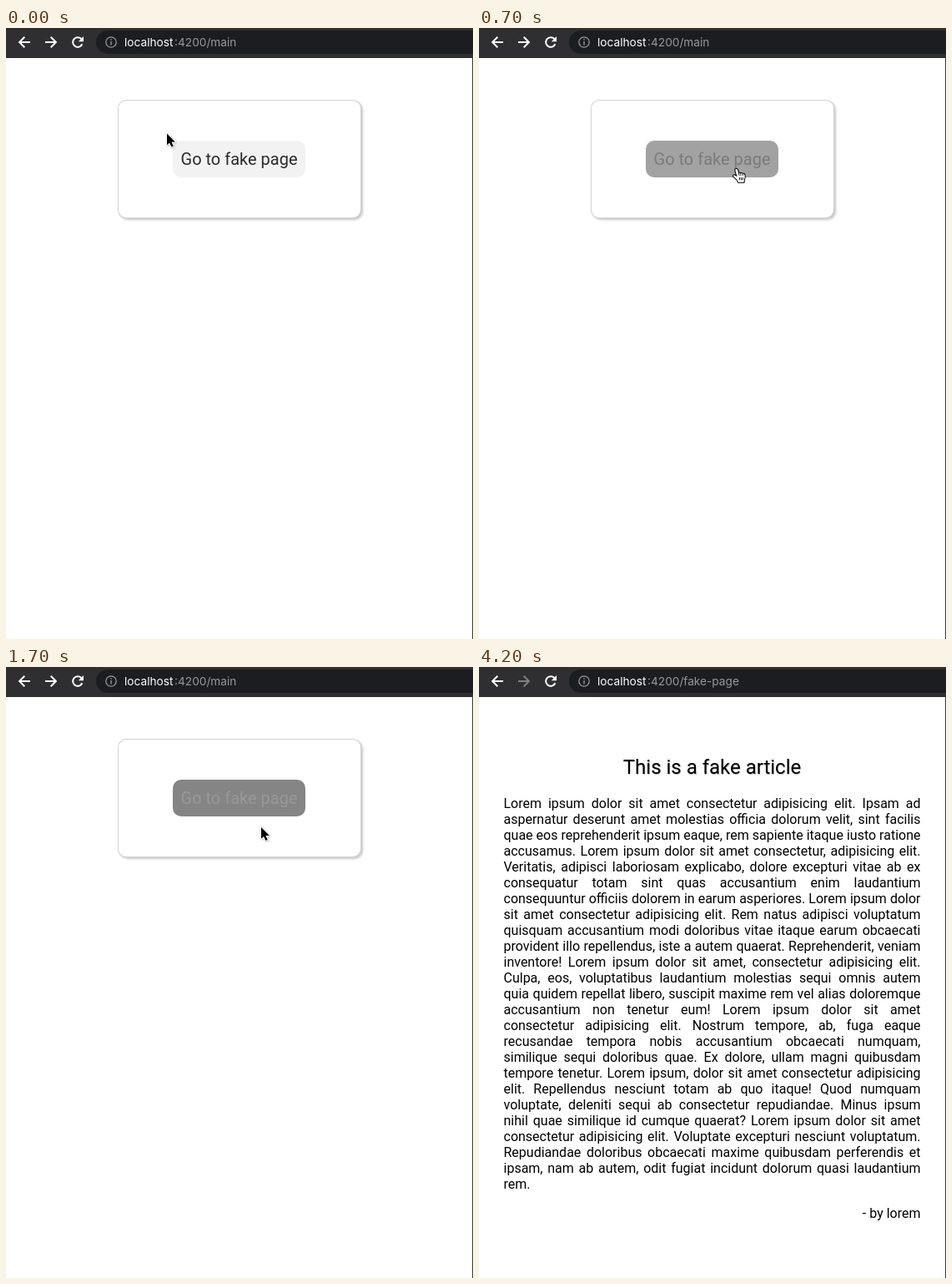
Write an HTML page with a canvas that moves like this. It is 560x732 px and loops after 4.6 s.

```html
<!DOCTYPE html>
<html lang="en">
<head>
<meta charset="utf-8">
<title>Page navigation</title>
<style>
  html, body { margin: 0; width: 100%; height: 100%; overflow: hidden; background: #fff; }
  canvas { display: block; width: 560px; height: 732px; }
</style>
</head>
<body>
<canvas id="stage" width="560" height="732"></canvas>
<script>
const ctx = document.getElementById('stage').getContext('2d');
const LOOP = 4600;
const ARTICLE_AT = 3300;
const INK = 43, PAPER = 242;

// Each pose holds until the next: start ms, cursor, x, y, button darkness.
const poses = [
  [0, 'arrow', 193, 126.5, 0],
  [100, 'hand', 245, 146, 0.1],
  [200, 'hand', 294, 166, 0.2],
  [300, 'arrow', 311, 179, 0],
  [600, 'hand', 308, 176, 0],
  [700, 'hand', 304, 168, 0.4],
  [800, 'hand', 301.5, 163, 0.85],
  [900, 'hand', 300.8, 161.5, 1],
  [1500, 'hand', 301.5, 170, 1],
  [1600, 'arrow', 306, 184, 0.95],
  [1700, 'arrow', 306, 192, 0.55],
  [1800, 'arrow', 306, 197, 0.12],
  [1900, 'arrow', 306, 198, 0],
  [ARTICLE_AT, 'beam', 195, 214.5, 0],
  [4000, 'beam', 190, 214.5, 0],
  [4100, 'none', 0, 0, 0]
];

const lines = `Lorem ipsum dolor sit amet consectetur adipisicing elit. Ipsam ad
aspernatur deserunt amet molestias officia dolorum velit, sint facilis
quae eos reprehenderit ipsum eaque, rem sapiente itaque iusto ratione
accusamus. Lorem ipsum dolor sit amet consectetur, adipisicing elit.
Veritatis, adipisci laboriosam explicabo, dolore excepturi vitae ab ex
consequatur totam sint quas accusantium enim laudantium
consequuntur officiis dolorem in earum asperiores. Lorem ipsum dolor
sit amet consectetur adipisicing elit. Rem natus adipisci voluptatum
quisquam accusantium modi doloribus vitae itaque earum obcaecati
provident illo repellendus, iste a autem quaerat. Reprehenderit, veniam
inventore! Lorem ipsum dolor sit amet, consectetur adipisicing elit.
Culpa, eos, voluptatibus laudantium molestias sequi omnis autem
quia quidem repellat libero, suscipit maxime rem vel alias doloremque
accusantium non tenetur eum! Lorem ipsum dolor sit amet
consectetur adipisicing elit. Nostrum tempore, ab, fuga eaque
recusandae tempora nobis accusantium obcaecati numquam,
similique sequi doloribus quae. Ex dolore, ullam magni quibusdam
tempore tenetur. Lorem ipsum, dolor sit amet consectetur adipisicing
elit. Repellendus nesciunt totam ab quo itaque! Quod numquam
voluptate, deleniti sequi ab consectetur repudiandae. Minus ipsum
nihil quae similique id cumque quaerat? Lorem ipsum dolor sit amet
consectetur adipisicing elit. Voluptate excepturi nesciunt voluptatum.
Repudiandae doloribus obcaecati maxime quibusdam perferendis et
ipsam, nam ab autem, odit fugiat incidunt dolorum quasi laudantium
rem.`.split('\n');

const arrowShape = new Path2D('M0 0V13.8L3.1 10.9 5.4 16 7.7 15 5.5 9.9H9.9Z');
const handShape = new Path2D('M5.6 10.2L3.4 3Q3 1 4.5.8 5.8.8 6.2 2.4L7.4 6.2Q8.6 5.2 9.6 6.4 ' +
  '11 5.4 12 6.8 14.2 6.2 14.6 8.4 15.2 11 14 13.5L13.6 16.8H7Q6 14 3.8 12.2L.9 9.6Q.8 8 2.4 8.2Z');
const handLines = new Path2D('M7.4 6.2L8.2 8.8M9.6 6.4L10.1 8.8M12 6.8L12.4 8.8M8.4 11V14.2M10.4 11V14.2M12.3 11V14.2');
const beamShape = new Path2D('M-2.5-7.5Q0-7.5 0-5.5 0-7.5 2.5-7.5M0-5.5V5.5M-2.5 7.5Q0 7.5 0 5.5 0 7.5 2.5 7.5M-1.5 3H1.5');

function text(str, x, y, font, color, align = 'left') {
  ctx.font = font;
  ctx.fillStyle = color;
  ctx.textAlign = align;
  ctx.fillText(str, x, y);
}

function box(x, y, w, h, r, color) {
  ctx.beginPath();
  ctx.roundRect(x, y, w, h, r);
  ctx.fillStyle = color;
  ctx.fill();
}

function stroke(path, color, width) {
  ctx.strokeStyle = color;
  ctx.lineWidth = width;
  ctx.stroke(path);
}

function shadow(color, offset, blur) {
  ctx.shadowColor = color;
  ctx.shadowOffsetX = ctx.shadowOffsetY = offset;
  ctx.shadowBlur = blur;
}

function navArrow(x, dir, color) {
  ctx.save();
  ctx.translate(x, 17);
  ctx.scale(dir, 1);
  stroke(new Path2D('M7 0H-5.5M.3-6.2L-5.9 0 .3 6.2'), color, 2);
  ctx.restore();
}

function drawToolbar(onArticle) {
  box(0, 0, 560, 36, 0, '#2f2f31');
  box(108, 3, 480, 28, 14, '#1c1d20');
  navArrow(22, 1, '#fff');
  navArrow(54, -1, onArticle ? '#7e7f82' : '#fff');

  const ring = new Path2D();
  ring.arc(86, 17, 5.8, 0.4, Math.PI * 2 - 0.7);
  stroke(ring, '#fff', 2);
  ctx.fillStyle = '#fff';
  ctx.fill(new Path2D('M93 10V16.2H86.8Z'));

  const info = new Path2D();
  info.arc(126, 17, 6.2, 0, Math.PI * 2);
  stroke(info, '#96999d', 1.3);
  box(125.3, 16, 1.4, 4.5, 0, '#96999d');
  box(125.3, 13.2, 1.4, 1.5, 0, '#96999d');

  const font = '13.7px Inter, sans-serif';
  text('localhost', 142, 22, font, '#fff');
  text(onArticle ? ':4200/fake-page' : ':4200/main', 202, 22, font, '#96989b');
}

function drawMain(dark) {
  ctx.save();
  shadow('rgba(0,0,0,.22)', 2, 3);
  box(134, 86, 292, 142, 10, '#d2d2d2');
  ctx.restore();
  box(135, 87, 290, 140, 9, '#fff');

  const gray = v => `rgb(${v},${v},${v})`;
  const mix = (a, b) => gray(Math.round(a + (b - a) * dark));
  box(200, 135, 159, 44, 10, mix(PAPER, INK));
  text('Go to fake page', 279.5, 164, '20px Roboto, sans-serif', mix(INK, PAPER), 'center');
}

function justify(line, y) {
  const words = line.split(' ');
  const widths = words.map(w => ctx.measureText(w).width);
  const gap = (500 - widths.reduce((a, b) => a + b)) / (words.length - 1);
  let x = 29.5;
  words.forEach((word, i) => {
    ctx.fillText(word, x, y);
    x += widths[i] + gap;
  });
}

function drawArticle() {
  ctx.save();
  shadow('rgba(0,0,0,.3)', 0.5, 1);
  text('This is a fake article', 279.5, 128, '24px Roboto, sans-serif', '#000', 'center');
  ctx.restore();

  const font = '16px Roboto, sans-serif';
  text('- by lorem', 529.5, 660, font, '#000', 'right');
  ctx.textAlign = 'left';
  lines.forEach((line, i) => justify(line, 169 + i * 19));
}

const cursors = {
  none() {},
  arrow() {
    ctx.save();
    shadow('rgba(0,0,0,.35)', 0.5, 2);
    stroke(arrowShape, '#fff', 2);
    ctx.restore();
    ctx.fillStyle = '#000';
    ctx.fill(arrowShape);
  },
  hand() {
    stroke(handShape, '#000', 2);
    ctx.fillStyle = '#fff';
    ctx.fill(handShape);
    stroke(handLines, '#000', 0.9);
  },
  beam() {
    stroke(beamShape, 'rgba(255,255,255,.8)', 2.4);
    stroke(beamShape, '#111', 1);
  }
};

function draw(now) {
  const t = now % LOOP;
  const [, cursor, x, y, dark] = poses.findLast(pose => pose[0] <= t);
  const onArticle = t >= ARTICLE_AT;
  box(0, 0, 560, 732, 0, '#fff');
  drawToolbar(onArticle);
  if (onArticle) drawArticle();
  else drawMain(dark);
  box(559, 36, 1, 696, 0, '#3a3a3c');

  ctx.save();
  ctx.translate(x, y);
  ctx.lineJoin = 'round';
  cursors[cursor]();
  ctx.restore();
}

const start = performance.now();
function tick() {
  draw(performance.now() - start);
  requestAnimationFrame(tick);
}
tick();
</script>
</body>
</html>
```
